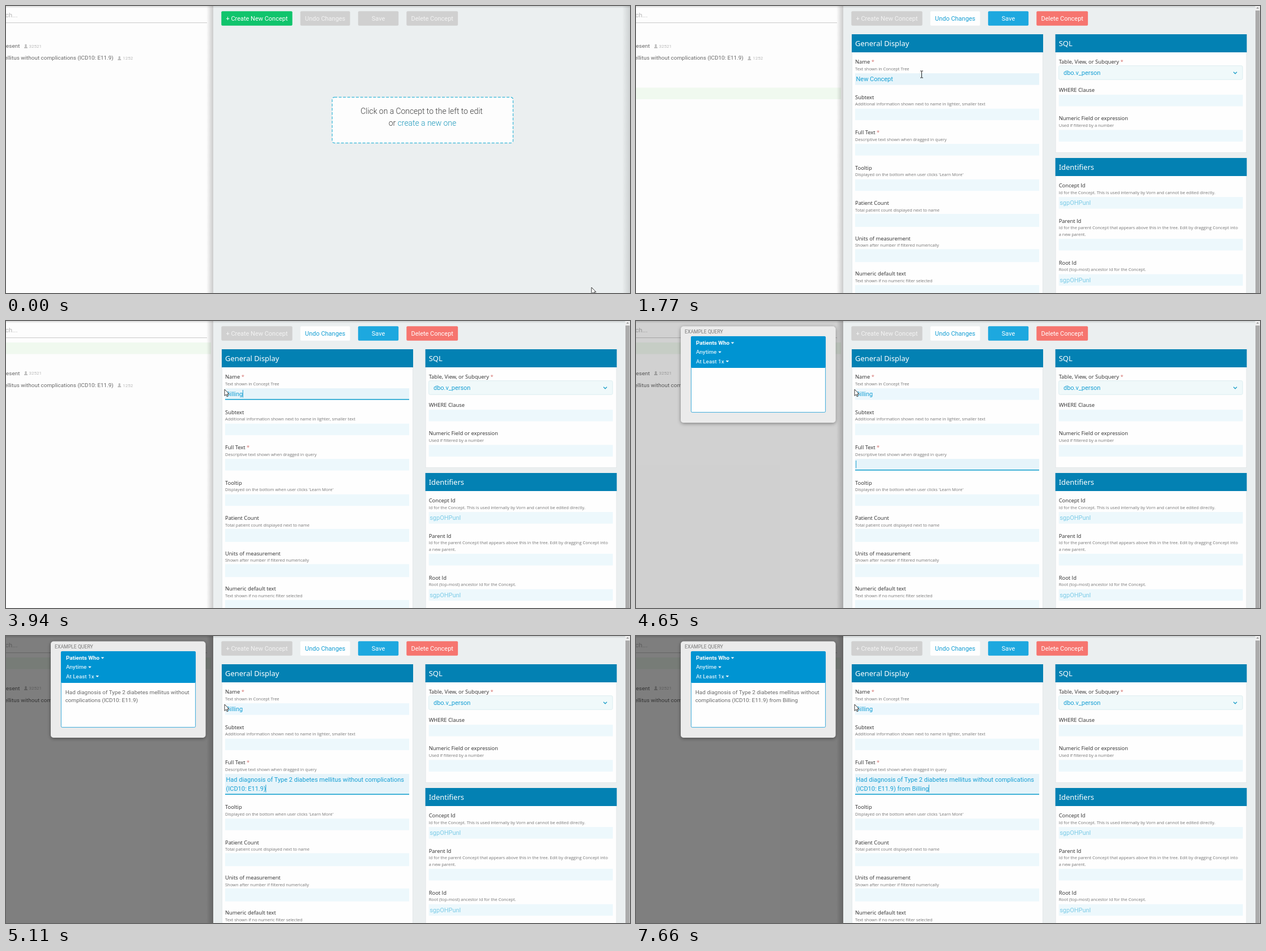
An HTML page that plays this animation: 1102 by 508 pixels, repeating every 8 s.

```html
<!DOCTYPE html>
<html lang="en">
<head>
<meta charset="utf-8">
<title>Concept editor</title>
<style>
  html, body { margin: 0; width: 100%; height: 100%; overflow: hidden; background: #fff; }
  svg { display: block; width: 100vw; height: 100vh; }
  text { white-space: pre; font-family: Roboto, sans-serif; }
  .btn, .val { font-size: 10.98px; }
  .btn { text-anchor: middle; }
  .val { fill: #169fd4; }
  .pale { fill: #7ccbe7; }
  .head { font: 500 12.95px "Noto Sans", "Open Sans", sans-serif; fill: #fff; }
  .label { font: 9.4px "Open Sans", sans-serif; fill: #2b2b2b; }
  .hint { font: 7.5px "Open Sans", sans-serif; fill: #757575; }
  .star { fill: #d4706c; }
  .row { font-size: 9.92px; fill: #686868; }
  .count { font-size: 8px; fill: #b9b9b9; }
  .end { text-anchor: end; }
  .big { font-size: 13.9px; font-weight: 300; fill: #3c3c3c; text-anchor: middle; }
</style>
</head>
<body>
<svg id="stage" viewBox="0 0 1102 508" preserveAspectRatio="none"></svg>
<script>
const LOOP = 8000;
const FORM_AT = 1080, RENAME_AT = 3020, SUBTEXT_AT = 4420, FULL_AT = 4560, PASTE_AT = 5110;
const NAME_KEYS = [3020, 3250, 3410, 3560, 3710, 3800, 3940];
const FULL_KEYS = [5580, 5740, 5890, 5950, 6120, 6180, 6410, 6580, 6730, 7280, 7430, 7500, 7660];
const FADE_STEPS = [4560, 4650, 4720, 4800, 4950];

const rect = (x, y, w, h, fill, more = '') =>
  `<rect x="${x}" y="${y}" width="${w}" height="${h}" fill="${fill}" ${more}/>`;
const text = (x, y, cls, str, more = '') =>
  `<text x="${x}" y="${y}" class="${cls}" ${more}>${str}</text>`;

function button(id, x, w, str) {
  return `<g id="${id}">${rect(x, 9.2, w, 25.6, '#d0d0d0', 'rx="2"')}` +
    `${text(x + w / 2, 25.8, 'btn', str, 'fill="#f3f3f3"')}</g>`;
}

function card(x, y, h, title) {
  return rect(x + .5, y + .5, 337, h, '#fefefe', 'stroke="#e3e8ea"') +
    rect(x, y, 338, 32, '#0381b3') + text(x + 6.1, y + 21.2, 'head', title);
}

// One labelled input; y is the middle of the label.
function field(x, y, label, hints = [], opt = {}) {
  const star = opt.required ? ' <tspan class="star">*</tspan>' : '';
  const grow = opt.tall ? 1.2 : 0;
  const top = y + 9 + (hints.length ? 11.6 : 0) + (hints.length > 1 ? 11.5 : 0);
  return text(x, y + 3.5, 'label', label + star) +
    hints.map((s, i) => text(x, y + 15.2 + i * 11.5, 'hint', s)).join('') +
    rect(x, top - grow, 325, 20.5 + 2 * grow, '#edf8fc', opt.id ? `id="${opt.id}"` : '') +
    (opt.value ? text(x + 1.5, top + 14, 'val pale', opt.value) : '');
}

function person(x, y) {
  return `<path transform="translate(${x} ${y})" fill="#bdbdbd" ` +
    `d="M0-3.8a1.9 1.9 0 0 1 1 3.4L1 .4Q3.1 1 3.1 3.4H-3.1Q-3.1 1-1 .4V-.4A1.9 1.9 0 0 1 0-3.8Z"/>`;
}

const option = (y, str, x, more) => text(106, y, '', str, `font-size="9.9" ${more}`) +
  `<path d="M${x} ${y - 4.6}h5.6l-2.8 3z" fill="#fff"/>`;

const fade = (id, x2, y2, a, b) =>
  `<linearGradient id="${id}" x2="${x2}" y2="${y2}"><stop stop-opacity="${a}"/>` +
  `<stop offset="1" stop-opacity="${b}"/></linearGradient>`;

const L = 387, R = 746.7;

const leftPane = rect(0, 0, 366, 508, '#fdfdfd') +
  text(20.5, 20, 'end', 'Search...', 'font-size="11.7" fill="#b8b8b8"') +
  rect(0, 29, 355, 1.2, '#cfcfcf') +
  rect(0, 144.5, 362, 20.5, '#f0f9ef', 'id="newRow"') +
  `<g id="list">${text(24.4, 74.4, 'row end', 'Present')}${person(35, 71.3)}` +
  text(40.5, 74.2, 'count', '32521') +
  text(189.8, 95.4, 'row end', 'Type 2 diabetes mellitus without complications (ICD10: E11.9)') +
  person(200.3, 92.6) + text(206.3, 95.4, 'count', '1252') + '</g>' +
  rect(0, 0, 366, 4, 'url(#topShade)') + rect(354, 0, 12, 508, 'url(#sideShade)');

const preview = '<g id="preview">' +
  rect(79, 9.5, 273.5, 170.5, '#ebebeb', 'rx="5" filter="url(#soft)"') +
  text(86, 22.3, '', 'EXAMPLE QUERY', 'font-size="8.7" fill="#777"') +
  rect(97.4, 27.4, 237.2, 134.2, '#fefefe', 'rx="2" stroke="#0d98d4" stroke-width=".8"') +
  rect(97, 27, 238, 56, '#0094d2', 'rx="2"') +
  option(42.1, 'Patients Who', 167.7, 'font-weight="700" fill="#fff"') +
  option(58.3, 'Anytime', 145.2, 'font-weight="500" fill="#d3eefa"') +
  option(74.6, 'At Least 1x', 158.5, 'font-weight="500" fill="#d3eefa"') +
  text(104.7, 102.6, 'row', '', 'id="prev1"') + text(104.7, 117.4, 'row', '', 'id="prev2"') + '</g>';

const empty = '<g id="empty">' +
  rect(576, 161.5, 319.5, 81, '#fdfdfd', 'rx="4" stroke="#4fbfdc" stroke-width="1.4" stroke-dasharray="5 2.6"') +
  text(734, 191.3, 'big', 'Click on a Concept to the left to edit') +
  text(735.5, 212, 'big', 'or <tspan fill="#1b98bb">create a new one</tspan>') +
  rect(1088, 0, 14, 508, 'url(#edgeShade)') + '</g>';

const form = '<g id="form">' +
  card(381, 50, 470, 'General Display') +
  field(L, 98.5, 'Name', ['Text shown in Concept Tree'], { required: true, id: 'nameBox' }) +
  rect(388, 122, 0, 13.5, '#3297fd', 'id="sel"') +
  text(388.5, 132.6, 'val', '', 'id="name"') +
  text(388.5, 132.6, 'val', 'New Concept', 'id="selText" clip-path="url(#selClip)" style="fill:#fff"') +
  field(L, 161, 'Subtext', ['Additional information shown next to name in lighter, smaller text']) +
  field(L, 223.5, 'Full Text', ['Descriptive text shown when dragged in query'], { required: true, id: 'fullBox' }) +
  text(388.5, 257.8, 'val', '', 'id="full1"') + text(388.5, 274.1, 'val', '', 'id="full2"') +
  '<g id="lower">' +
  field(L, 286.2, 'Tooltip', ["Displayed on the bottom when user clicks 'Learn More'"]) +
  field(L, 348.7, 'Patient Count', ['Total patient count displayed next to name'], { tall: true }) +
  field(L, 411, 'Units of measurement', ['Shown after number if filtered numerically'], { tall: true }) +
  field(L, 473.3, 'Numeric default text', ['Text shown if no numeric filter selected']) + '</g>' +
  rect(L, 0, 325, 1.6, '#1ba3cf', 'id="focus"') + rect(0, 0, 1, 13.5, '#1b9fd0', 'id="caret"') +
  card(740.6, 50, 209, 'SQL') +
  text(R, 102, 'label', 'Table, View, or Subquery <tspan class="star">*</tspan>') +
  rect(R, 105.8, 324.5, 24.4, '#f0f9fa', 'rx="2" stroke="#dcedf0"') +
  text(755, 121.9, 'val', 'dbo.v_person') +
  '<path d="M1055.2 116.8l3 3 3-3" fill="none" stroke="#1b9fc8" stroke-width="1.3"/>' +
  field(R, 148, 'WHERE Clause') +
  field(R, 198.8, 'Numeric Field or expression', ['Used if filtered by a number']) +
  card(740.6, 269, 250, 'Identifiers') +
  field(R, 317.5, 'Concept Id',
    ['Id for the Concept. This is used internally by Vorn and cannot be edited directly.'], { value: 'sgpOHPunl' }) +
  field(R, 380, 'Parent Id',
    ['Id for the parent Concept that appears above this in the tree. Edit by dragging Concept into', 'a new parent.']) +
  field(R, 454, 'Root Id', ['Root (top-most) ancestor Id for the Concept.'], { value: 'sgpOHPunl' }) +
  rect(1093.5, 0, 8.5, 508, '#ededed') + rect(1094, 8, 7.5, 500, '#ababab') +
  '<path d="M1095.5 4.5l2.3-2.6 2.3 2.6z" fill="#888"/></g>';

const cursor = '<g id="cursor"><path id="arrow" fill="#fff" stroke="#222" stroke-width=".9" ' +
  'd="M0 0V11.4L2.6 9 4.3 12.8 6 12 4.4 8.3H8Z"/>' +
  '<path id="beam" fill="none" stroke="#222" d="M-2.5-6H-.6Q0-6 0-5.4 0-6 .6-6H2.5M0-5.5V5.5M-2.5 6H-.6Q0 6 0 5.4 0 6 .6 6H2.5"/>' +
  '<path id="hand" fill="#fff" stroke="#222" stroke-width=".9" ' +
  'd="M-1 0Q0-1 1 0V4.5L5 5.4Q6.4 6 6.2 8L5.2 12.5H-.6L-4 7.6Q-3.6 6.2-1 8Z"/></g>';

const stage = document.getElementById('stage');
stage.innerHTML = '<defs>' + fade('topShade', 0, 1, .14, 0) + fade('sideShade', 1, 0, 0, .2) +
  fade('edgeShade', 1, 0, 0, .13) +
  '<filter id="soft" x="-10%" y="-10%" width="120%" height="125%">' +
  '<feDropShadow dx="0" dy="1.5" stdDeviation="3" flood-opacity=".4"/></filter>' +
  '<clipPath id="selClip"><rect id="selMask" y="122" height="14"/></clipPath></defs>' +
  leftPane + rect(0, 0, 366, 508, '#000', 'id="dim"') + preview +
  rect(366, 0, 736, 508, '#ebeff0') + rect(366, 0, 736, 4, 'url(#topShade)') +
  button('create', 380.3, 125.4, '+ Create New Concept') + button('undo', 519.8, 87.8, 'Undo Changes') +
  button('save', 621.8, 71.4, 'Save') + button('del', 707.3, 90.8, 'Delete Concept') +
  empty + form + cursor;

const el = {};
stage.querySelectorAll('[id]').forEach(n => { el[n.id] = n; });
const set = (n, attrs) => { for (const k in attrs) n.setAttribute(k, attrs[k]); };
const show = (n, on) => { n.style.display = on ? '' : 'none'; };
const put = (n, s) => { if (n.textContent !== s) n.textContent = s; };
const paint = (id, bg, fg) => {
  set(el[id].firstChild, { fill: bg });
  set(el[id].lastChild, { fill: fg });
};
const typed = (str, keys, t) => str.slice(0, keys.filter(k => t >= k).length);
const ease = p => p * p * (3 - 2 * p);

function along(pts, p) {
  const s = Math.min(p, 1) * (pts.length - 1);
  const i = Math.min(Math.floor(s), pts.length - 2);
  return pts[i].map((v, k) => v + (pts[i + 1][k] - v) * (s - i));
}

// The pointer moves in held steps.
function pointer(t) {
  const step = (from, gap, last) => Math.min(last, Math.floor((t - from) / gap));
  if (t < 70) return [1034, 498];
  if (t < FORM_AT) return along([[1034, 498], [700, 200], [452, 19]], ease((step(70, 77, 10) + 1) / 11));
  if (t < 1870) return along([[452, 19], [478, 62], [504.5, 121]], ease(step(FORM_AT, 76.6, 9) / 9));
  if (t < 2020) return [503, 119];
  return along([[503, 119], [460, 118], [378, 119], [386, 121]], (step(2020, 76.2, 8) + 1) / 9);
}

function drawPointer(t) {
  const [x, y] = pointer(t);
  const onCreate = t < FORM_AT && x < 505 && y < 35;
  const onName = t >= FORM_AT && x > 387 && y > 112;
  set(el.cursor, { transform: `translate(${x} ${y})` });
  show(el.hand, onCreate);
  show(el.beam, onName);
  show(el.arrow, !onCreate && !onName);
  return { x, onCreate, onName };
}

function drawButtons(open, hover) {
  if (open) {
    paint('create', '#d0d0d0', '#f3f3f3');
    paint('undo', '#fefefe', '#169fd4');
    paint('save', '#1da8df', '#fff');
    paint('del', '#f6756f', '#fff');
  } else {
    paint('create', hover ? '#10b866' : '#10c46c', '#fff');
    ['undo', 'save', 'del'].forEach(id => paint(id, '#d0d0d0', '#f3f3f3'));
  }
}

function drawFocus(t, caretLine) {
  const nameOn = t >= 2300 && t < SUBTEXT_AT;
  const pasted = t >= PASTE_AT;
  show(el.focus, t >= 2300);
  show(el.caret, t >= RENAME_AT);
  const bottom = nameOn ? 139.6 : t < FULL_AT ? 202 : pasted ? 281 : 264.6;
  set(el.focus, { y: bottom - 1.6 });
  const y = nameOn ? 122 : t < FULL_AT ? 184.5 : pasted ? 263.3 : 247;
  const w = caretLine.textContent && (nameOn || pasted) ? caretLine.getComputedTextLength() : 0;
  set(el.caret, { x: 388.1 + w, y });
}

function render(t) {
  const open = t >= FORM_AT, renamed = t >= RENAME_AT, pasted = t >= PASTE_AT;
  const at = drawPointer(t);
  drawButtons(open, at.onCreate);
  show(el.empty, !open);
  show(el.form, open);

  show(el.newRow, open);
  set(el.newRow, { y: renamed ? 38 : 144.5 });
  set(el.list, { transform: `translate(0 ${renamed ? 21.3 : 0})` });

  put(el.name, renamed ? typed('Billing', NAME_KEYS, t) : 'New Concept');
  const selecting = t >= 2300 && !renamed;
  const from = Math.max(388, Math.min(at.x, 454.5));
  const range = { x: from, width: selecting ? 454.5 - from : 0 };
  set(el.sel, range);
  set(el.selMask, range);
  show(el.selText, selecting);
  const nameLit = at.onName || (t >= 2300 && t < SUBTEXT_AT);
  set(el.nameBox, { fill: nameLit ? '#e6f4fa' : '#ecf7fd' });

  const tail = '(ICD10: E11.9)' + typed(' from Billing', FULL_KEYS, t);
  put(el.full1, pasted ? 'Had diagnosis of Type 2 diabetes mellitus without complications' : '');
  put(el.full2, pasted ? tail : '');
  put(el.prev1, pasted ? 'Had diagnosis of Type 2 diabetes mellitus without' : '');
  put(el.prev2, pasted ? 'complications ' + tail : '');
  set(el.fullBox, { height: pasted ? 37 : 20.5, fill: t >= FULL_AT ? '#e6f4fa' : '#edf8fc' });
  set(el.lower, { transform: `translate(0 ${pasted ? 16.4 : 0})` });
  drawFocus(t, pasted ? el.full2 : el.name);

  const held = FADE_STEPS.filter(s => t >= s).pop() || 0;
  set(el.dim, { 'fill-opacity': Math.max(0, Math.min(.5, (held - 4545) / 590)) });
  show(el.preview, t >= FULL_AT);
  set(el.preview, { opacity: held === FULL_AT ? .5 : 1 });
}

function tick() {
  render(performance.now() % LOOP);
  requestAnimationFrame(tick);
}
tick();
</script>
</body>
</html>
```
